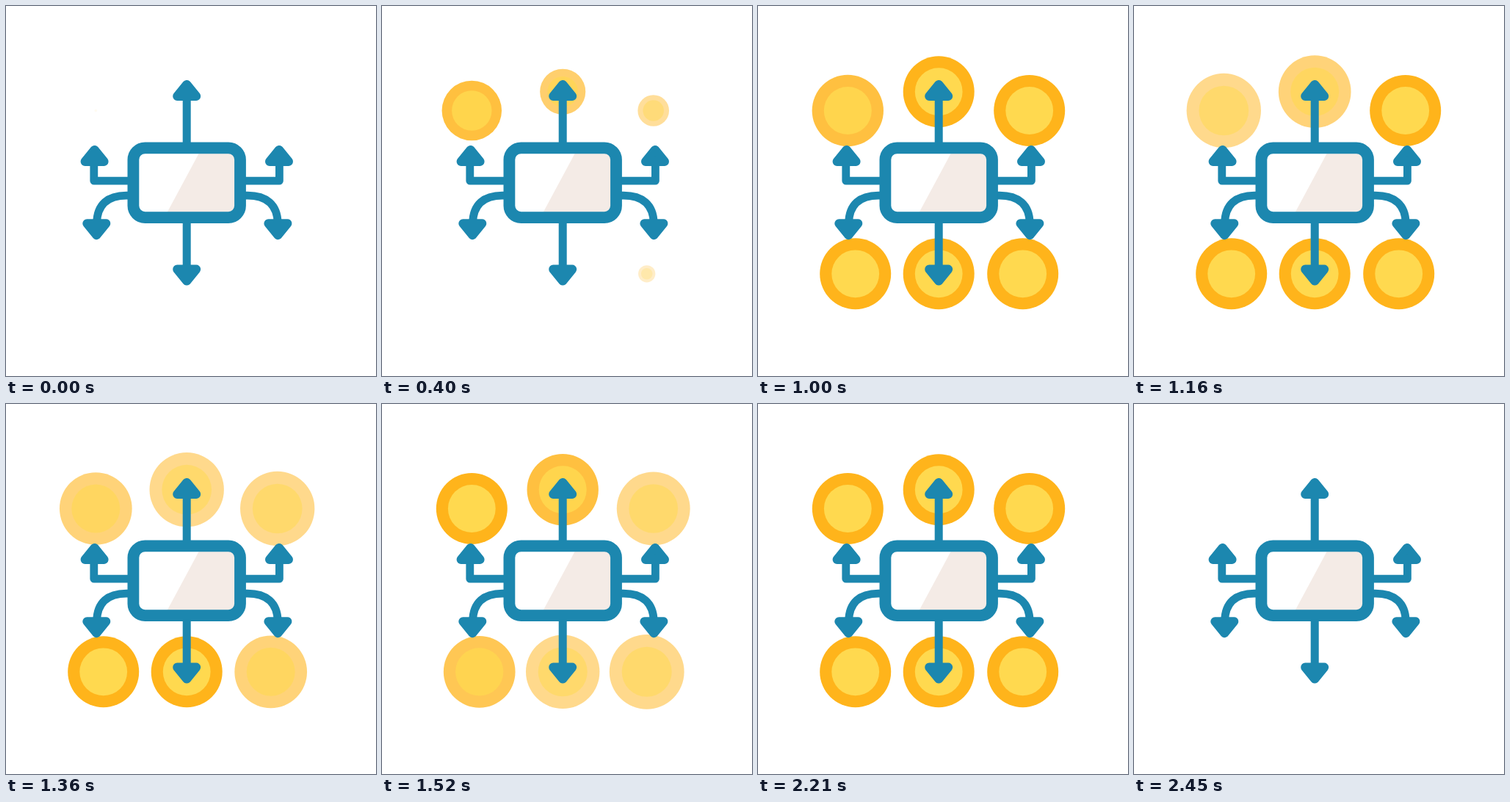
An HTML page with a canvas for the animation above (2490 ms loop, 504x504 px).

```html
<!DOCTYPE html>
<html lang="en">
<head>
<meta charset="utf-8">
<title>Coin distribution</title>
<style>
  html, body { margin: 0; width: 100%; height: 100%; overflow: hidden; background: #fff; }
  canvas { display: block; width: 504px; height: 504px; }
</style>
</head>
<body>
<canvas id="stage" width="504" height="504"></canvas>
<script>
const ctx = document.getElementById('stage').getContext('2d');

const LOOP = 2490;
const BLUE = '#1c87af', RING = '#ffb41b', GOLD = '#ffd94f', SHADE = '#f4ebe6';
const STAGGER = 100;
const POP = { start: -20, length: 500 };
const PULSE = { start: 960, length: 500, ramp: 120 };
const EXIT = { start: 2210, length: 240 };

// Clockwise from the upper left, in order of appearance.
const COINS = [
  [122.3, 142.5], [246.2, 116.7], [369.7, 142.5],
  [360.7, 364.8], [246.2, 364.8], [132.7, 364.8]
];

const clamp = v => Math.max(0, Math.min(1, v));
const smooth = v => v * v * (3 - 2 * v);

function coinState(index, t) {
  const delay = index * STAGGER;
  const pop = clamp((t - POP.start - delay) / POP.length);
  const exit = 1 - clamp((t - EXIT.start) / EXIT.length);
  const u = t - PULSE.start - delay;
  const edge = Math.max(0, Math.min(u, PULSE.length - u));
  const swell = smooth(clamp(edge / (PULSE.length / 2)));
  const fade = clamp(edge / PULSE.ramp);
  return {
    scale: pop * exit * (1 + 0.05 * swell),
    alpha: pop * exit * (1 - 0.5 * fade)
  };
}

function disc(x, y, r, color) {
  ctx.fillStyle = color;
  ctx.beginPath();
  ctx.arc(x, y, r, 0, Math.PI * 2);
  ctx.fill();
}

function drawCoin([x, y], { scale, alpha }) {
  if (scale <= 0) return;
  ctx.globalAlpha = alpha;
  disc(x, y, 48.5 * scale, RING);
  disc(x, y, 32.4 * scale, GOLD);
  ctx.globalAlpha = 1;
}

function line(path, width) {
  ctx.lineWidth = width;
  ctx.stroke(new Path2D(path));
}

// dir is 1 for an upward head, -1 for a downward one.
function drawHead(x, tip, dir) {
  const base = tip + 22.6 * dir;
  const path = new Path2D(`M${x} ${tip + 6.6 * dir}L${x + 13} ${base}H${x - 13}Z`);
  ctx.lineWidth = 12;
  ctx.fill(path);
  ctx.stroke(path);
}

function drawArrows() {
  ctx.fillStyle = ctx.strokeStyle = BLUE;
  ctx.lineJoin = 'round';
  line('M246.2 190V118M246.2 290V364', 11);
  line('M170 238.2H119.8V208M322 238.2H372.4V208', 10.8);
  line('M170 258.2H164C139 258.2 124 270 123.6 296', 10.8);
  line('M322 258.2H329C354 258.2 369.8 270 370.2 296', 10.8);
  drawHead(246.2, 100.3, 1);
  drawHead(246.2, 381.2, -1);
  drawHead(120.6, 189.3, 1);
  drawHead(372, 189.3, 1);
  drawHead(123.3, 318.8, -1);
  drawHead(370.4, 318.8, -1);
}

function drawScreen() {
  const frame = new Path2D();
  frame.roundRect(173.4, 193.3, 145.6, 94.8, 16);
  ctx.fillStyle = '#fff';
  ctx.fill(frame);
  ctx.save();
  ctx.clip(frame);
  ctx.fillStyle = SHADE;
  ctx.fill(new Path2D('M266.8 193.3H319V288.1H215.8Z'));
  ctx.restore();
  ctx.strokeStyle = BLUE;
  ctx.lineWidth = 15.8;
  ctx.stroke(frame);
}

function render(now) {
  const t = now % LOOP;
  ctx.fillStyle = '#fff';
  ctx.fillRect(0, 0, 504, 504);
  COINS.forEach((coin, i) => drawCoin(coin, coinState(i, t)));
  drawArrows();
  drawScreen();
}

let start;
function tick(now) {
  start ??= now;
  render(now - start);
  requestAnimationFrame(tick);
}
render(0);
requestAnimationFrame(tick);
</script>
</body>
</html>
```
